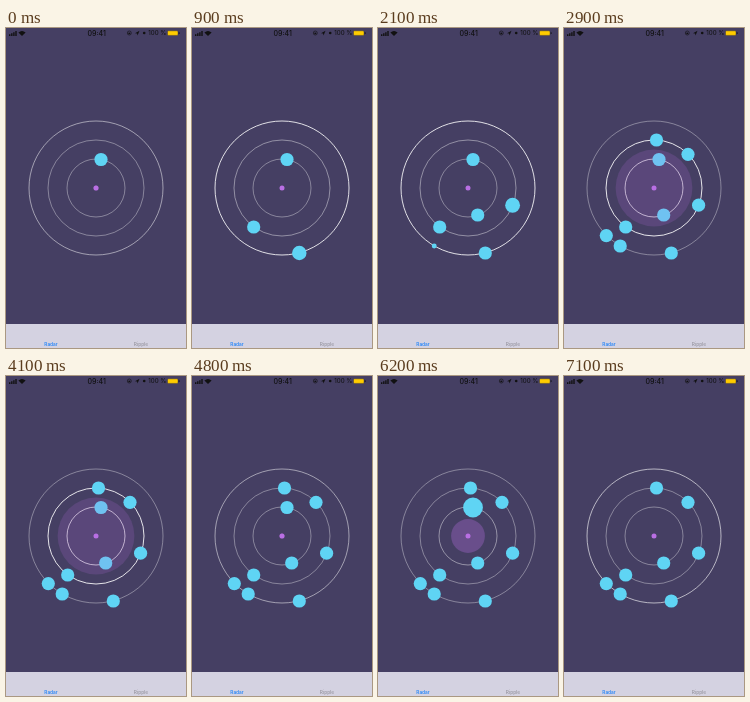
Animation of 180 by 320 pixels, one loop 7200 ms. Source, as an HTML page:

```html
<!DOCTYPE html>
<html lang="en">
<head>
<meta charset="utf-8">
<title>Radar</title>
<style>
  html, body { margin: 0; width: 100%; height: 100%; overflow: hidden; background: #453f63; }
  svg { display: block; width: 100%; height: 100%; }
  text { font-family: Inter, "Liberation Sans", sans-serif; text-anchor: middle; }
</style>
</head>
<body>
<svg viewBox="0 0 180 320">
  <rect width="180" height="320" fill="#453f63"/>
  <g id="rings" fill="none" stroke="#fff"/>
  <g id="items" fill="#5fd4f4"/>
  <circle id="ripple" cx="90" cy="160" fill="#b96fe4"/>
  <circle cx="90" cy="160" r="2.5" fill="#b96fe4"/>

  <g id="status" fill="#111">
    <path d="M3 6.3h1.4V8H3zM5.1 5.3h1.4V8H5.1zM7.2 4.2h1.4V8H7.2zM9.3 3.1h1.4V8H9.3z"/>
    <path d="M16 8L12.4 4.5Q16 1.4 19.6 4.5Z"/>
    <text x="90.7" y="7.6" font-size="7" font-weight="500">09:41</text>
    <circle cx="123.3" cy="5" r="2" fill="none" stroke="#111" stroke-width=".6"/>
    <path d="M122.4 4.6h1.8v1.5h-1.8z"/>
    <path d="M129 5.2L133.5 2.8L131.5 7.5L131.1 5.4Z"/>
    <circle cx="138.2" cy="5" r="1.3"/>
    <text x="151.3" y="7.2" font-size="6.2">100 %</text>
    <rect x="161.5" y="2.8" width="10.5" height="4.6" rx="1" fill="#fc0" stroke="#29263a" stroke-width=".4"/>
    <path d="M172.7 4.2h.8v1.8h-.8z"/>
  </g>

  <rect y="296" width="180" height="24" fill="#d4d2e1"/>
  <g font-size="4.8" font-weight="500">
    <text x="45" y="318.3" fill="#147efb">Radar</text>
    <text x="135" y="318.3" fill="#96949f">Ripple</text>
  </g>
</svg>
<script>
const LOOP = 7200, PULSE = 1200, SWEEP = 900, ITEM_RADIUS = 6.6;
const $ = id => document.getElementById(id);
const clamp = v => Math.max(0, Math.min(1, v));
const ease = v => { v = clamp(v); return v * v * (3 - 2 * v); };

function circle(parent, attrs) {
  const el = document.createElementNS("http://www.w3.org/2000/svg", "circle");
  for (const key in attrs) el.setAttribute(key, attrs[key]);
  return parent.appendChild(el);
}

// radius, time of peak brightness within a pulse
const rings = [[29, 330], [48, 500], [67, 880]].map(([r, peak]) =>
  ({ peak, el: circle($("rings"), { cx: 90, cy: 160, r }) }));

// x, y, time of appearance
const items = [
  [95, 131.5, -500], [61.7, 199, 150], [107.3, 225, 570],
  [99.7, 187, 1200], [134.6, 177.2, 1800], [56.2, 218, 2020],
  [92.5, 112, 2170], [124, 126.3, 2310], [42.3, 207.6, 2450]
].map(([cx, cy, start]) => ({ start, el: circle($("items"), { cx, cy }) }));

function pop(age) {
  if (age < 250) return 1.15 * clamp(age / 250);
  return 1.15 - 0.15 * ease((age - 250) / 200);
}

function glow(age) {
  return age < 0 ? clamp(1 + age / 150) : 1 - clamp(age / 450);
}

function draw(now) {
  const time = now % LOOP, phase = time % PULSE;

  for (const { peak, el } of rings) {
    const age = (phase - peak + PULSE + 150) % PULSE - 150;
    el.setAttribute("stroke-opacity", 0.36 + 0.5 * glow(age));
  }

  const sweep = clamp(phase / SWEEP);
  $("ripple").setAttribute("r", 2.5 + 64.5 * sweep);
  $("ripple").setAttribute("opacity", 0.4 * (1 - sweep));

  items.forEach(({ start, el }, i) => {
    let scale = pop(time - start);
    if (i === 0) scale *= (1 + 0.5 * ease((time - 4900) / 300)) * (1 - ease((time - 6300) / 300));
    el.setAttribute("r", ITEM_RADIUS * scale);
  });
}

const origin = performance.now();
function tick() {
  draw(performance.now() - origin);
  requestAnimationFrame(tick);
}
tick();
</script>
</body>
</html>
```
